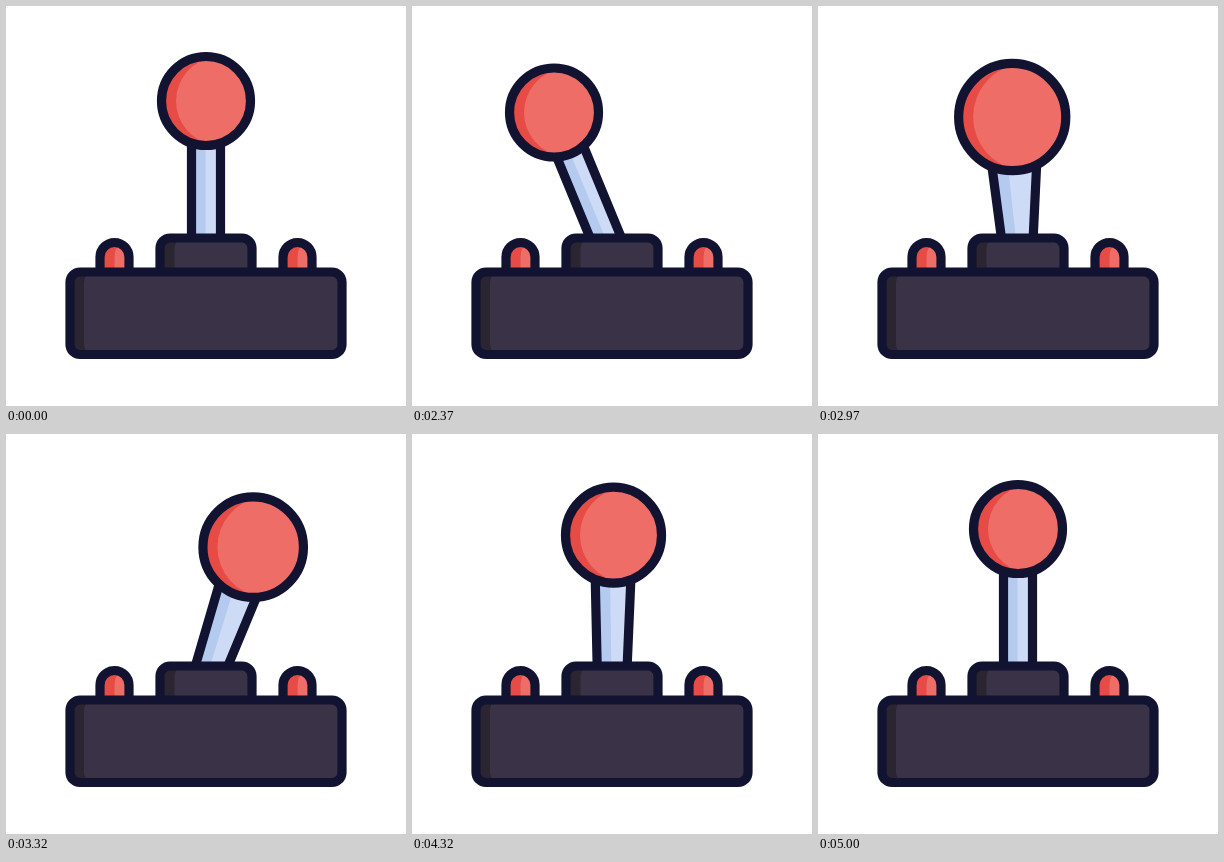
These frames come from a looping animation (400 by 400 pixels, 5.02 s). An HTML page:

```html
<!DOCTYPE html>
<html lang="en">
<head>
<meta charset="utf-8">
<title>Joystick</title>
<style>
  html, body { margin: 0; width: 100%; height: 100%; overflow: hidden; background: #fff; }
  svg { display: block; width: 100vw; height: 100vh; }
  .line { fill: none; stroke: #121331; stroke-width: 9.2; stroke-linejoin: round; }
  .dark { fill: #2a2530; }
  .body { fill: #3a3347; }
  .red { fill: #e74b45; }
  .coral { fill: #ee6d66; }
  .steel { fill: #b5caef; }
  .sky { fill: #cddbf6; }
</style>
</head>
<body>
<svg viewBox="0 0 400 400">
  <defs>
    <g id="button">
      <path class="red" d="M-14.5 266V251a14.5 14.5 0 0 1 29 0V266Z"/>
      <path class="coral" d="M0 266V251Q0 241 7 238.300A14.5 14.5 0 0 1 14.500 251V266Z"/>
      <path class="line" d="M-14.500 266V251a14.500 14.500 0 0 1 29 0V266"/>
    </g>
  </defs>

  <g id="stick">
    <path id="rod" class="steel"/>
    <path id="rodLight" class="sky"/>
    <path id="rodLine" class="line"/>
  </g>
  <g id="ball">
    <circle class="red"/>
    <path id="ballLight" class="coral"/>
    <circle class="line"/>
  </g>

  <use href="#button" x="108.500"/>
  <use href="#button" x="291.500"/>

  <path class="dark" d="M154 266V242a10 10 0 0 1 10-10H236a10 10 0 0 1 10 10V266Z"/>
  <path class="body" d="M168.500 266V242a10 10 0 0 1 10-10H236a10 10 0 0 1 10 10V266Z"/>
  <path class="line" d="M154 266V242a10 10 0 0 1 10-10H236a10 10 0 0 1 10 10V266"/>

  <rect class="dark" x="64" y="266" width="272" height="82.500" rx="10"/>
  <rect class="body" x="78" y="266" width="258" height="82.500" rx="10"/>
  <rect class="line" x="64" y="266" width="272" height="82.500" rx="10"/>
</svg>
<script>
  const LOOP = 5020;
  const PIVOT = { x: 200, y: 247 };
  const $ = id => document.getElementById(id);

  // [time, degrees]: sideways lean of the stick
  const lean = curve([
    [2000, 0], [2370, -22.4], [2490, -24], [2700, -19], [2970, -2.5], [3250, 16.5],
    [3560, 25.5], [3650, 25], [3820, 20.7], [4020, 8], [4170, 2], [4320, 0.6], [4500, 0]
  ]);
  // [time, px]: growth of the ball as it swings toward or away from the viewer
  const depth = curve([
    [2460, 0], [2700, 6], [2990, 9.1], [3280, 6.4], [3530, 0.4], [3650, -4.5], [3820, -10],
    [3980, -13], [4170, -5], [4240, -0.3], [4320, 3.5], [4400, 4.4], [5000, 0]
  ]);

  // Monotone cubic through the given points, flat at both ends and at extremes
  function curve(pts) {
    const slope = i => (pts[i + 1][1] - pts[i][1]) / (pts[i + 1][0] - pts[i][0]);
    const tan = pts.map((p, i) => {
      if (i === 0 || i === pts.length - 1) return 0;
      const a = slope(i - 1), b = slope(i);
      return a * b <= 0 ? 0 : 2 * a * b / (a + b);
    });
    return t => {
      if (t <= pts[0][0]) return pts[0][1];
      const i = pts.findIndex(p => p[0] > t) - 1;
      if (i < 0) return pts[pts.length - 1][1];
      const [t0, v0] = pts[i], [t1, v1] = pts[i + 1];
      const h = t1 - t0, s = (t - t0) / h, e = s * s * (3 - 2 * s);
      return v0 + (v1 - v0) * e
        + h * s * (1 - s) * (tan[i] * (1 - s) - tan[i + 1] * s);
    };
  }

  function draw(t) {
    const deg = lean(t), grow = depth(t), near = Math.max(grow, 0);
    const len = 152 - (grow > 0 ? 1.75 : -1.04) * grow;
    const r = 44.5 + grow;
    const half = 14.5, top = half + (grow > 0 ? 1.35 : 0.45) * grow;
    const tipY = PIVOT.y - len;

    const rod = `M${200 - half} ${PIVOT.y}L${200 - top} ${tipY}H${200 + top}L${200 + half} ${PIVOT.y}Z`;
    $('rod').setAttribute('d', rod);
    $('rodLine').setAttribute('d', rod);
    $('rodLight').setAttribute('d',
      `M199.500 ${PIVOT.y}L${199.5 - near} ${tipY}H${200 + top}L${200 + half} ${PIVOT.y}Z`);
    $('stick').setAttribute('transform', `rotate(${deg} ${PIVOT.x} ${PIVOT.y})`);

    const a = deg * Math.PI / 180;
    const x = PIVOT.x + len * Math.sin(a), y = PIVOT.y - len * Math.cos(a);
    $('ball').setAttribute('transform', `translate(${x} ${y})`);
    for (const c of $('ball').querySelectorAll('circle')) c.setAttribute('r', r);

    // Lit part: overlap of the ball with itself shifted right
    const shift = 14.5, mid = shift / 2, h = Math.sqrt(r * r - mid * mid);
    $('ballLight').setAttribute('d',
      `M${mid} ${-h}A${r} ${r} 0 0 0 ${mid} ${h}A${r} ${r} 0 0 0 ${mid} ${-h}Z`);
  }

  const start = performance.now();
  function tick() {
    draw((performance.now() - start) % LOOP);
    requestAnimationFrame(tick);
  }
  tick();
</script>
</body>
</html>
```
